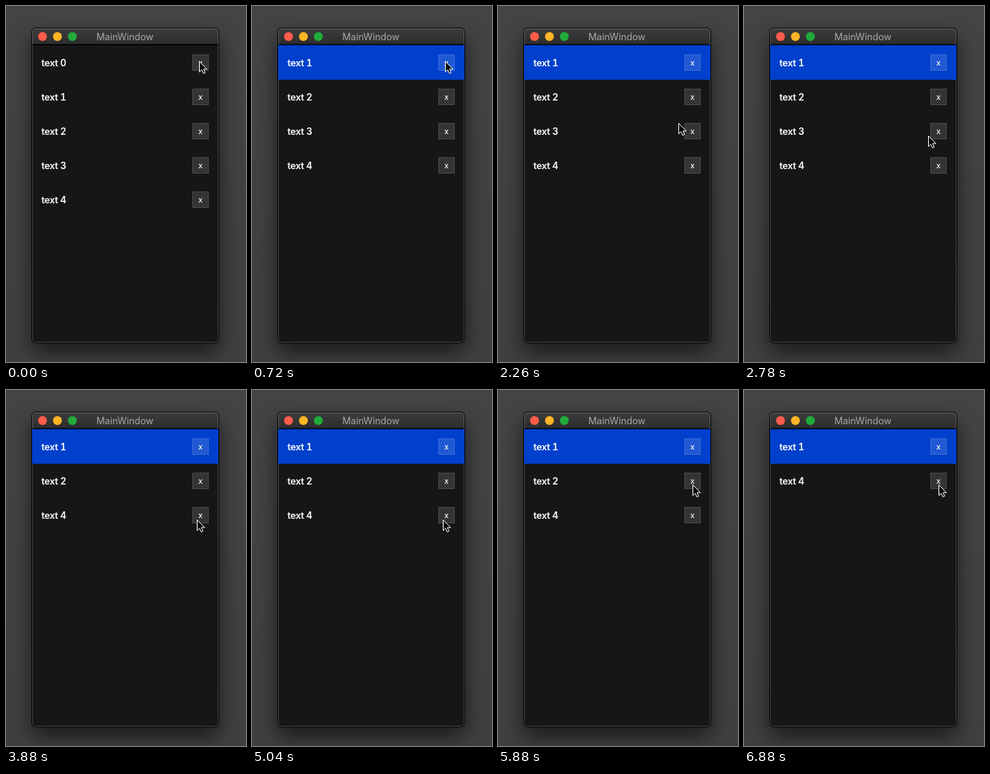
Animation of 322x478 px, one loop 8820 ms. Source, as an HTML page:

```html
<!DOCTYPE html>
<html lang="en">
<head>
<meta charset="utf-8">
<title>MainWindow</title>
<style>
  html, body { margin: 0; width: 100%; height: 100%; overflow: hidden; background: #3d3e40; }
  svg { display: block; position: absolute; inset: 0; }
  text { font-family: Inter, "Open Sans", sans-serif; }
  .title { font-size: 12.6px; fill: #a9a9a9; text-anchor: middle; }
  .label {
    font-size: 12.7px; font-weight: 600; letter-spacing: -.35px; fill: #fff;
    font-variant-numeric: tabular-nums;
  }
  .cross { font-size: 10.5px; font-weight: 500; fill: #f2f2f2; text-anchor: middle; }
</style>
</head>
<body>
<svg width="322" height="478" viewBox="0 0 322 478">
  <defs>
    <linearGradient id="desk" x2="0" y2="1">
      <stop stop-color="#434446"/><stop offset="1" stop-color="#3e3f41"/>
    </linearGradient>
    <linearGradient id="bar" x2="0" y2="1">
      <stop stop-color="#3c3c3c"/><stop offset="1" stop-color="#2d2d2d"/>
    </linearGradient>
    <filter id="blur" x="-40%" y="-30%" width="180%" height="160%">
      <feGaussianBlur stdDeviation="14"/>
    </filter>
    <clipPath id="frame"><rect x="35" y="30" width="250" height="422" rx="5"/></clipPath>
  </defs>

  <rect width="322" height="478" fill="url(#desk)"/>
  <rect x="35" y="42" width="250" height="422" rx="6" opacity=".62" filter="url(#blur)"/>
  <rect x="34" y="29" width="252" height="424" rx="6" fill="#050505"/>
  <g clip-path="url(#frame)">
    <rect x="35" y="30" width="250" height="422" fill="#161616"/>
    <rect x="35" y="30" width="250" height="21" fill="url(#bar)"/>
    <rect x="35" y="51" width="250" height="2" fill="#050505"/>
  </g>
  <rect x="35.5" y="30.5" width="249" height="421" rx="4.5" fill="none" stroke="#fff" stroke-opacity=".2"/>
  <rect id="selection" x="35" y="52.5" width="250" height="46.5" fill="#0040cc"/>
  <circle cx="49" cy="41" r="6" fill="#fc5b4a"/>
  <circle cx="69" cy="41" r="6" fill="#fdb524"/>
  <circle cx="89" cy="41" r="6" fill="#20ab3c"/>
  <text class="title" x="159.5" y="46">MainWindow</text>

  <g id="rows"></g>
  <path id="cursor" d="M.5 .5V14.7L3.7 11.7 5.8 16.5 8.2 15.5 6.1 10.8H10.6Z"
        fill="#000" stroke="#fff" stroke-linejoin="round"/>
</svg>

<script>
const LOOP = 8820;
const ROW_COUNT = 5;
const ROW_HEIGHT = 46;

// Which row is deleted, when its button goes down and when it disappears.
const deletions = [
  { row: 0, down: 500, gone: 720 },
  { row: 3, down: 3580, gone: 3880 },
  { row: 2, down: 6520, gone: 6860 }
];

const byId = id => document.getElementById(id);
const mix = (a, b, p) => a + (b - a) * p;
const progress = (time, from, to) => Math.min(1, Math.max(0, (time - from) / (to - from)));
const easeInOut = p => p * p * (3 - 2 * p);
const easeOut = p => 1 - (1 - p) ** 2.5;

function addRow(index) {
  const row = document.createElementNS("http://www.w3.org/2000/svg", "g");
  row.innerHTML = `
    <text class="label" x="47.5" y="81">text ${index}</text>
    <rect x="250" y="65" width="22" height="22" fill="#fff" fill-opacity=".13"/>
    <rect x="250.5" y="65.5" width="21" height="21" fill="none" stroke="#fff" stroke-opacity=".1"/>
    <rect class="press" x="251" y="67" width="20" height="19" fill="#fff" fill-opacity=".12"/>
    <text class="cross" x="261" y="80">x</text>`;
  byId("rows").append(row);
  return row;
}

// The pointer swings left on its way down, rests, then glides up.
function cursorAt(time) {
  const swing = progress(time, 1740, 3060);
  const fall = easeInOut(progress(time, 1740, 2450));
  const rise = easeOut(progress(time, 5040, 5880));
  const x = mix(mix(259, 256, swing) - 16.5 * Math.sin(Math.PI * swing ** .9), 261, rise);
  const y = mix(mix(74, 174, fall), 127, rise);
  return [Math.round(x), Math.round(y)];
}

const rows = Array.from({ length: ROW_COUNT }, (_, index) => addRow(index));
const show = (element, visible) => element.setAttribute("visibility", visible ? "visible" : "hidden");
const place = (element, x, y) => element.setAttribute("transform", `translate(${x} ${y})`);

function render(time) {
  const gone = deletions.filter(d => time >= d.gone).map(d => d.row);
  const pressed = deletions.find(d => time >= d.down && time < d.gone)?.row;

  rows.forEach((row, index) => {
    const slot = index - gone.filter(other => other < index).length;
    place(row, 0, slot * ROW_HEIGHT);
    show(row, !gone.includes(index));
    show(row.querySelector(".press"), index === pressed);
  });
  show(byId("selection"), gone.length > 0);
  place(byId("cursor"), ...cursorAt(time));
}

const start = performance.now();
function tick() {
  render((performance.now() - start) % LOOP);
  requestAnimationFrame(tick);
}
tick();
</script>
</body>
</html>
```
